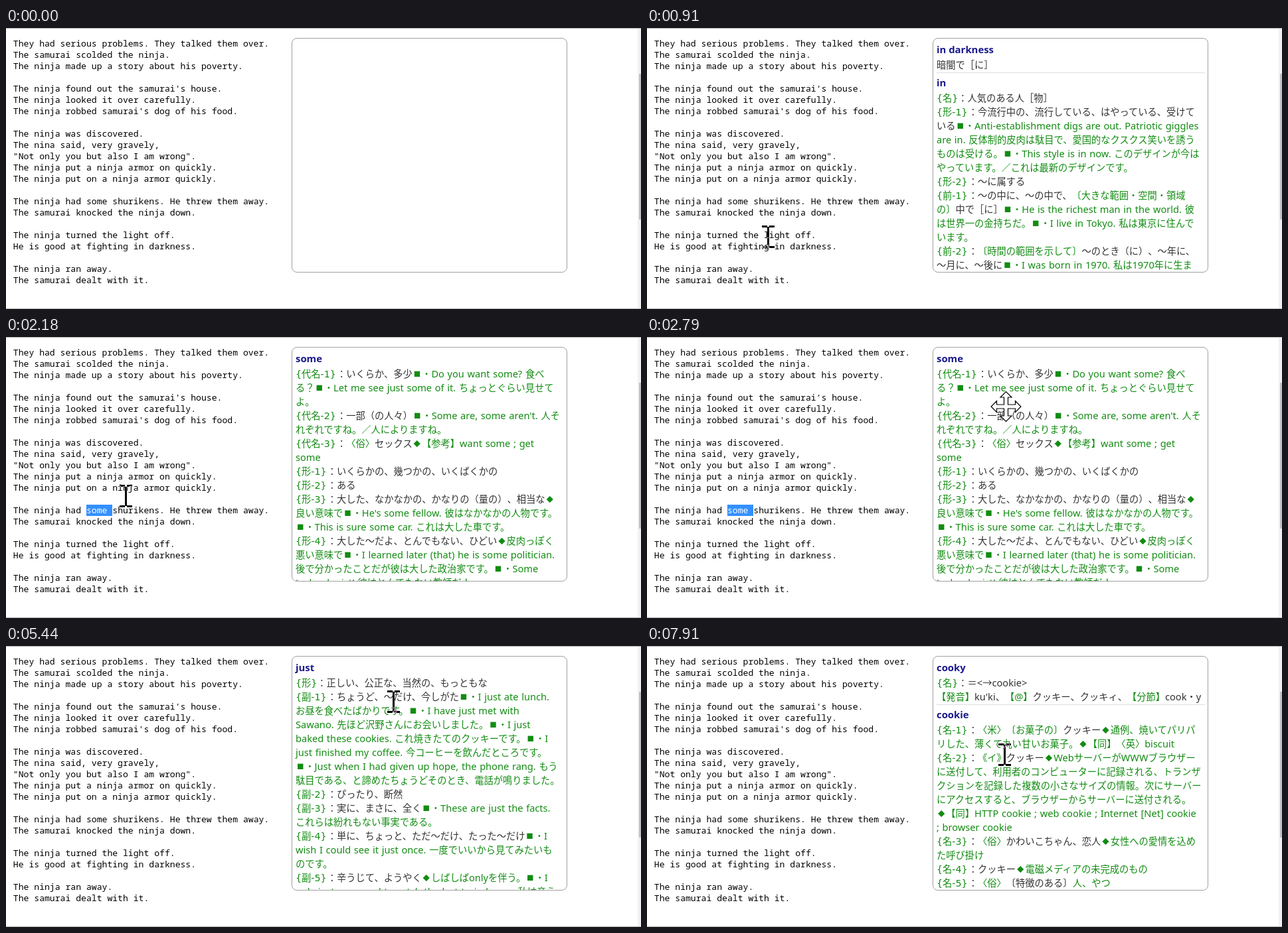
An HTML page that plays this animation: 956x424 px, repeating every 7.99 s.

```html
<!DOCTYPE html>
<html lang="ja">
<head>
<meta charset="utf-8">
<title>Popup dictionary</title>
<style>
html, body { margin: 0; width: 100%; height: 100%; overflow: hidden; background: #fff; }
svg { display: block; width: 956px; height: 424px; }
text { white-space: pre; text-spacing-trim: space-all; }
.page { font: 13.12px "Noto Sans Mono", "DejaVu Sans Mono", monospace; fill: #000; }
.entry { font: 350 14.25px "Noto Sans CJK JP", "Noto Sans CJK", sans-serif; fill: #333; }
.entry .en { font: 14.6px "Noto Sans", "Open Sans", sans-serif; word-spacing: .9px; }
.entry .tag { font: 14.25px "DejaVu Sans", sans-serif; }
.entry .mark { font-size: 10.5px; }
.entry .ex { fill: #128c12; }
.head { font: bold 14.9px "Noto Sans", "Open Sans", sans-serif; fill: #1a1a8c; }
.on { fill: #fff !important; }
#beam { fill: #fff; mix-blend-mode: difference; }
#move { fill: #fff; stroke: #000; stroke-width: 1.2; }
</style>
</head>
<body>
<svg viewBox="0 0 956 424">
  <defs><clipPath id="clip"><rect x="431" y="16" width="413" height="352" rx="7"/></clipPath></defs>
  <rect width="956" height="424" fill="#fff"/>
  <rect x="951" width="5" height="424" fill="#f1f1f1"/>
  <rect x="953" y="69" width="3" height="220" fill="#c1c1c1"/>
  <path d="M0 .5H956M0 423.5H956" stroke="#b4b4b4"/>
  <rect x="430.5" y="15.5" width="414" height="353" rx="7.5" fill="#fff" stroke="#a0a0a0"/>
  <g id="marks" fill="#3390ff"></g>
  <g id="page" class="page"></g>
  <g id="panels" clip-path="url(#clip)"></g>
  <path id="beam" d="M-9.5 -17h8v2h3v-2h8v3h-8v28h8v3h-8v-2h-3v2h-8v-3h8v-28h-8z"/>
  <path id="move"/>
</svg>
<script>
const LOOP = 7990, EM = 14.25, LEFT = 436;
const $ = id => document.getElementById(id);

function add(parent, tag, attrs, text) {
  const el = document.createElementNS("http://www.w3.org/2000/svg", tag);
  for (const k in attrs) el.setAttribute(k, attrs[k]);
  if (text !== undefined) el.textContent = text;
  parent.appendChild(el);
  return el;
}

const story = `They had serious problems. They talked them over.
The samurai scolded the ninja.
The ninja made up a story about his poverty.

The ninja found out the samurai's house.
The ninja looked it over carefully.
The ninja robbed samurai's dog of his food.

The ninja was discovered.
The nina said, very gravely,
"Not only you but also I am wrong".
The ninja put a ninja armor on quickly.
The ninja put on a ninja armor quickly.

The ninja had ^some ^shurikens. He threw them away.
The samurai knocked the ninja down.

The ninja turned the light off.
He is good at fighting in darkness.

The ninja ran away.
The samurai dealt with it.`;

// # heading, --- rule, | switches plain and green text, ^ encloses a selectable word
const entries = [`#in darkness
暗闇で［に］
---
#in
{名}人気のある人［物］
{形-1}今流行中の、流行している、はやっている、受けて
いる|■・Anti-establishment digs are out. Patriotic giggles
|are in. 反体制的皮肉は駄目で、愛国的なクスクス笑いを誘う
|ものは受ける。■・This style is in now. このデザインが今は
|やっています。／これは最新のデザインです。
{形-2}〜に属する
{前-1}〜の中に、〜の中で、|〔大きな範囲・空間・領域
|の〕|中で［に］|■・He is the richest man in the world. 彼
|は世界一の金持ちだ。■・I live in Tokyo. 私は東京に住んで
|います。
{前-2}|〔時間の範囲を示して〕|〜のとき（に）、〜年に、
〜月に、〜後に|■・I was born in 1970. 私は1970年に生ま`,
`#some
{代名-1}いくらか、多少|■・Do you want some? 食べ
|る？■・Let me see ^just ^some of it. ちょっとぐらい見せて
|よ。
{代名-2}一部（の人々）|■・Some are, some aren't. 人そ
|れぞれですね。／人によりますね。
{代名-3}|〈俗〉|セックス|◆【参考】want some ; get
|some
{形-1}いくらかの、幾つかの、いくばくかの
{形-2}ある
{形-3}大した、なかなかの、かなりの（量の）、相当な|◆
|良い意味で■・He's some fellow. 彼はなかなかの人物です。
|■・This is sure some car. これは大した車です。
{形-4}大した〜だよ、とんでもない、ひどい|◆皮肉っぽく
|悪い意味で■・I learned later (that) he is some politician.
|後で分かったことだが彼は大した政治家です。■・Some
|technologist! 彼はとんでもない教師だ！`,
`#just
{形}正しい、公正な、当然の、もっともな
{副-1}ちょうど、〜だけ、今しがた|■・I just ate lunch.
|お昼を食べたばかりです。■・I have just met with
|Sawano. 先ほど沢野さんにお会いしました。■・I just
|baked these ^cookies^. これ焼きたてのクッキーです。■・I
|just finished my coffee. 今コーヒーを飲んだところです。
|■・Just when I had given up hope, the phone rang. もう
|駄目である、と諦めたちょうどそのとき、電話が鳴りました。
{副-2}ぴったり、断然
{副-3}実に、まさに、全く|■・These are just the facts.
|これらは紛れもない事実である。
{副-4}単に、ちょっと、ただ〜だけ、たった〜だけ|■・I
|wish I could see it just once. 一度でいいから見てみたいも
|のです。
{副-5}辛うじて、ようやく|◆しばしばonlyを伴う。■・I
|only just managed to catch the last train home. 私は辛う`,
`#cooky
{名}＝<→cookie>
|【発音】|ku'ki、|【@】|クッキー、クッキィ、|【分節】|cook・y
---
#cookie
{名-1}|〈米〉〔お菓子の〕|クッキー|◆通例、焼いてパリパ
|リした、薄くて丸い甘いお菓子。◆【同】〈英〉biscuit
{名-2}|《イ》|クッキー|◆WebサーバーがWWWブラウザー
|に送付して、利用者のコンピューターに記録される、トランザ
|クションを記録した複数の小さなサイズの情報。次にサーバー
|にアクセスすると、ブラウザーからサーバーに送付される。
|◆【同】HTTP cookie ; web cookie ; Internet [Net] cookie
|; browser cookie
{名-3}|〈俗〉|かわいこちゃん、恋人|◆女性への愛情を込め
|た呼び掛け
{名-4}クッキー|◆電磁メディアの未完成のもの
{名-5}|〈俗〉|〔特徴のある〕|人、やつ`];

// Latin, CJK and small centred marks are set as separate runs
function runs(line, text, cls, latin, x) {
  for (const part of text.match(/[ -~]+|[■◆]|[^ -~■◆]+/g) || []) {
    const mark = /[■◆]/.test(part);
    const kind = mark ? "mark" : /^[ -~]/.test(part) ? latin : "";
    const last = line.lastElementChild;
    const after = last && last.classList.contains("mark");
    const span = add(line, "tspan", { class: cls + " " + kind }, part);
    if (x !== undefined) { span.setAttribute("x", x); x = undefined; }
    if (mark || after) {
      span.setAttribute("dx", 1.9);
      span.setAttribute("dy", mark ? -1.4 : 1.4);
    }
  }
}

function entryLine(group, src, y) {
  const line = add(group, "text", { x: LEFT, y, class: "entry" });
  const tag = /^\{([^-}]+)(-\d)?\}/.exec(src);
  let x = LEFT;
  if (tag) {
    runs(line, tag[0], "ex", "tag");
    x += 18.1 + tag[1].length * EM + (tag[2] ? 15.5 : 0);
    runs(line, "：", "", "en", x);
    x += EM;
    src = src.slice(tag[0].length);
  }
  let green = false, word = false;
  for (const part of src.split(/([|^])/)) {
    if (part === "|") green = !green;
    else if (part === "^") word = !word;
    else if (part) {
      runs(line, part, (green ? "ex" : "") + (word ? " word" : ""), "en", x);
      x = undefined;
    }
  }
}

story.split("\n").forEach((src, i) => {
  const line = add($("page"), "text", { x: 10.8, y: 28 + 17 * i });
  src.split("^").forEach((part, k) => add(line, "tspan", { class: k % 2 ? "word" : "" }, part));
});

const panels = entries.map(src => {
  const group = add($("panels"), "g", {});
  let y = 38;
  for (const row of src.split("\n")) {
    if (row === "---") {
      add(group, "rect", { x: LEFT, y: y - 15, width: 404, height: 1, fill: "#dedede" });
      y += 6;
    } else if (row[0] === "#") {
      add(group, "text", { x: LEFT, y, class: "head" }, row.slice(1));
      y += 23;
    } else {
      entryLine(group, row, y);
      y += 21;
    }
  }
  return group;
});

// from, to, then the selection box
const words = [...document.querySelectorAll(".word")];
const marks = [
  [1850, 4340, 121, 253, 39, 17],
  [4490, 4560, 575, 67, 31, 21],
  [6980, 7050, 525, 130, 53, 21]
].map(([from, to, x, y, width, height], i) =>
  ({ from, to, word: words[i], rect: add($("marks"), "rect", { x, y, width, height }) }));

// one arm of the move cursor, turned four times
const arm = [[-3, -3], [-3, -14], [-8.5, -14], [0, -22.4], [8.5, -14], [3, -14]];
const outline = [];
for (let q = 0, c = 1, s = 0; q < 4; q++, [c, s] = [-s, c])
  for (const [x, y] of arm) outline.push([x * c - y * s, x * s + y * c]);
$("move").setAttribute("d", "M" + outline.join("L") + "Z");

const shows = [[760, 0], [1060, 1], [4560, 2], [7050, 3]];

// start, end, steps, target x, y
const path = [
  [450, 760, 5, 187.5, 322],
  [840, 1140, 5, 138.5, 256],
  [2100, 2790, 10, 540.5, 105],
  [3400, 3780, 6, 590.5, 79],
  [5290, 6060, 11, 511.5, 140],
  [6520, 6520, 1, 528.5, 140],
  [7910, 7910, 1, 538.5, 164]
];

function pointer(t) {
  let x = 270.5, y = 440;
  for (const [t0, t1, n, tx, ty] of path) {
    if (t < t0) break;
    const k = Math.min(n - 1, Math.floor((t - t0) / Math.max(1, t1 - t0) * (n - 1) + 1e-6));
    const p = (k + 1) / n, e = p * p * (3 - 2 * p);
    x += (tx - x) * e;
    y += (ty - y) * e;
  }
  return [Math.floor(x) + .5, Math.round(y)];
}

const show = (el, on) => { el.style.display = on ? "" : "none"; };

function draw(t) {
  let current = -1;
  for (const [at, i] of shows) if (t >= at) current = i;
  panels.forEach((p, i) => show(p, i === current));
  for (const m of marks) {
    const on = t >= m.from && t < m.to;
    show(m.rect, on);
    m.word.classList.toggle("on", on);
  }
  const [x, y] = pointer(t), moving = t >= 2790 && t < 3400;
  show($("beam"), t >= 450 && !moving);
  show($("move"), moving);
  for (const id of ["beam", "move"]) $(id).setAttribute("transform", `translate(${x} ${y})`);
}

const start = performance.now();
function tick(now) {
  draw(Math.max(0, now - start) % LOOP);
  requestAnimationFrame(tick);
}
draw(0);
requestAnimationFrame(tick);
</script>
</body>
</html>
```
